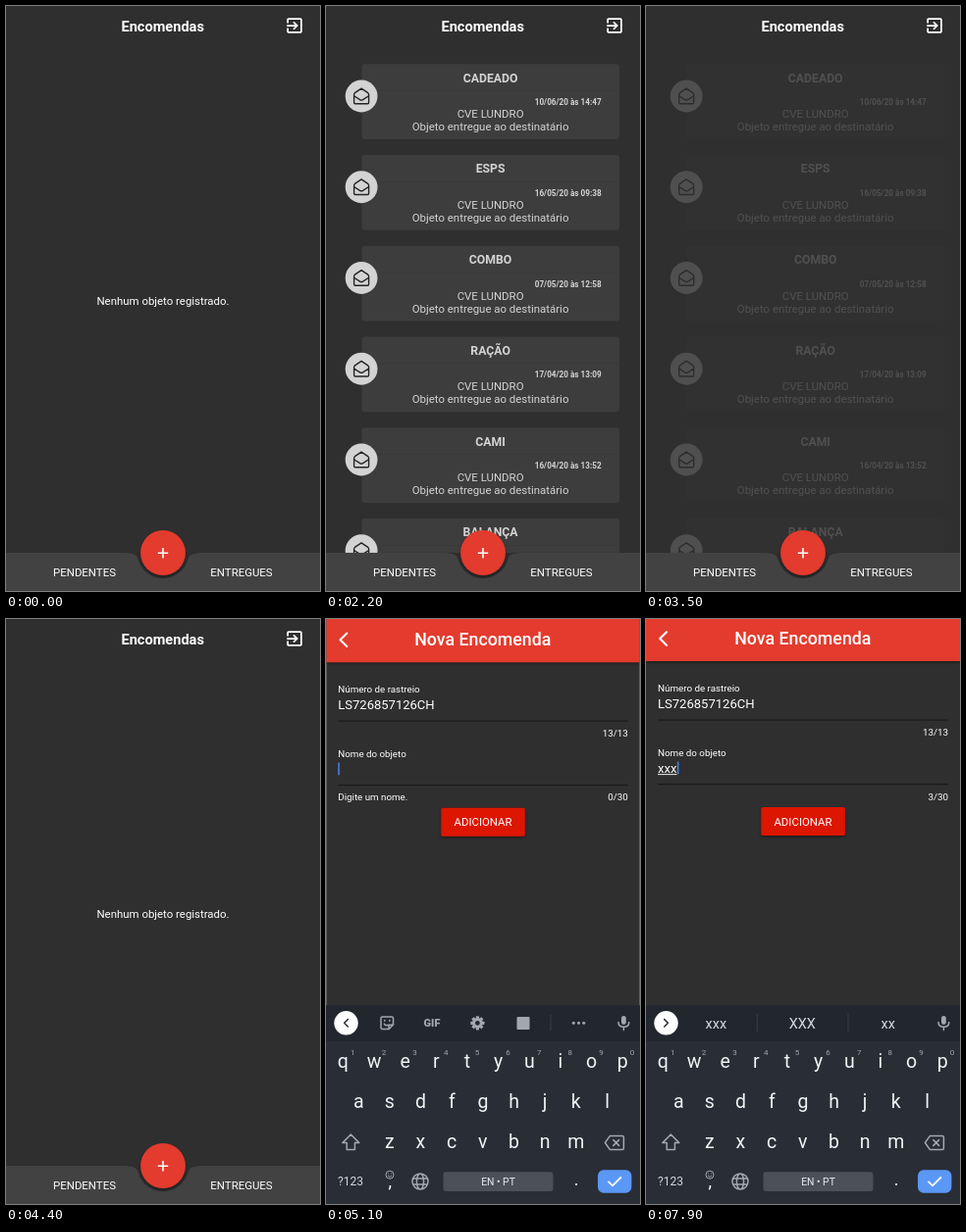
An HTML page that plays this animation: 320 by 597 pixels, repeating every 8000 ms.

```html
<!DOCTYPE html>
<html lang="pt">
<head>
<meta charset="utf-8">
<title>Encomendas</title>
<style>
html, body { margin: 0; width: 100%; height: 100%; overflow: hidden; background: #2f2f2f; }
svg { display: block; width: 100%; height: 100%; }
text { font-family: Roboto, "Open Sans", sans-serif; fill: #fff; white-space: pre; }
.line { fill: none; stroke-linecap: round; stroke-linejoin: round; }
.grey { stroke: #a3a8af; stroke-width: 1.5; }
</style>
</head>
<body>
<svg id="stage" viewBox="0 0 320 597" xmlns="http://www.w3.org/2000/svg"></svg>
<script>
const LOOP = 8000;
const RED = [227, 59, 46];
const TAB_MS = 1000, TO_DONE = 1595, TO_PENDING = 3230;
const OPEN_AT = 4502, OPEN_MS = 640, KEYS_AT = 4540;
const TYPED = [6800, 7200, 7600];
const STATUS = 28; // page area above the visible stage

const $ = id => document.getElementById(id);
const clamp = v => Math.max(0, Math.min(1, v));
const span = (t, from, len) => clamp((t - from) / len);
const mix = (a, b, k) => a + (b - a) * k;
const set = (id, attrs) => { for (const k in attrs) $(id).setAttribute(k, attrs[k]); };
const show = (id, on) => set(id, { display: on ? 'inline' : 'none' });

function bezier(x1, y1, x2, y2) {
  const at = (a, b, s) => 3 * a * s * (1 - s) ** 2 + 3 * b * s * s * (1 - s) + s ** 3;
  return x => {
    if (x <= 0 || x >= 1) return clamp(x);
    let lo = 0, hi = 1;
    for (let i = 0; i < 24; i++) {
      const mid = (lo + hi) / 2;
      if (at(x1, x2, mid) < x) lo = mid; else hi = mid;
    }
    return at(y1, y2, lo);
  };
}
const standard = bezier(.4, 0, .2, 1);
const accelerate = bezier(.4, 0, 1, 1);
const decelerate = bezier(0, 0, .2, 1);

const text = (s, x, y, size, { anchor = 'middle', weight = 400, fill = '#fff', id = '' } = {}) =>
  `<text ${id && `id="${id}"`} x="${x}" y="${y}" font-size="${size}" font-weight="${weight}" text-anchor="${anchor}" style="fill:${fill}">${s}</text>`;
const rect = (x, y, w, h, fill, r = 0, extra = '') =>
  `<rect x="${x}" y="${y}" width="${w}" height="${h}" rx="${r}" fill="${fill}" ${extra}/>`;
const line = (d, color, width, extra = '') =>
  `<path class="line" d="${d}" stroke="${color}" stroke-width="${width}" ${extra}/>`;
const icon = d => `<path class="line grey" d="${d}"/>`;

function card([name, date], i) {
  return `<g transform="translate(0 ${(i * 92.75).toFixed(2)})">
    ${rect(33, 59.3, 262.3, 76.7, '#424242', 3)}
    ${rect(33, 86.3, 262.3, .8, '#3b3b3b')}
    ${text(name, 164, 77.5, 12.24, { weight: 700 })}
    ${text(date, 277, 101, 8.16, { weight: 700, anchor: 'end' })}
    ${text('CVE LUNDRO', 164, 114, 11.43)}
    ${text('Objeto entregue ao destinatário', 164, 127, 11.43)}
    <circle cx="32.5" cy="92" r="16.4" fill="#fff"/>
    ${line('M25 90.2 Q25 89.3 25.8 88.7 L32.5 84.2 L39.2 88.7 Q40 89.3 40 90.2 V98.6 Q40 99.8 38.8 99.8 H26.2 Q25 99.8 25 98.6Z M25.4 92 L31 95.6 Q32.5 96.5 34 95.6 L39.6 92', '#222', 1.4)}
  </g>`;
}

const parcels = [
  ['CADEADO', '10/06/20 às 14:47'], ['ESPS', '16/05/20 às 09:38'],
  ['COMBO', '07/05/20 às 12:58'], ['RAÇÃO', '17/04/20 às 13:09'],
  ['CAMI', '16/04/20 às 13:52'], ['BALANÇA', '']
];

const home = `
  ${rect(0, 0, 320, 597, '#2f2f2f')}
  <g clip-path="url(#body)">
    <g id="empty">${text('Nenhum objeto registrado.', 160, 304.7, 11.43)}</g>
    <g id="list">${parcels.map(card).join('')}</g>
  </g>
  ${text('Encomendas', 159.7, 25.5, 14.6, { weight: 700 })}
  <path transform="translate(283.7 9.7) scale(.86)" fill="#fff" d="M10.09 15.59L11.5 17l5-5-5-5-1.41 1.41L12.67 11H3v2h9.67l-2.58 2.59zM19 3H5c-1.11 0-2 .9-2 2v4h2V5h14v14H5v-4H3v4c0 1.1.89 2 2 2h14c1.1 0 2-.9 2-2V5c0-1.1-.9-2-2-2z"/>
  <path fill="#424242" filter="url(#shade)" d="M0 558H120.9Q133.1 558 134.7 564.4A26.1 26.1 0 0 0 185.3 564.4Q186.9 558 199.1 558H320V597H0Z"/>
  ${text('PENDENTES', 80, 582, 11.43)}
  ${text('ENTREGUES', 240, 582, 11.43)}
  <g id="fab">
    <circle cx="160" cy="558" r="22.9" fill="rgb(${RED})" filter="url(#shade)"/>
    ${line('M160 553 V563.4 M154.8 558.2 H165.2', '#fff', 1.6, 'style="stroke-linecap:butt"')}
  </g>`;

const form = `
  ${rect(0, -STATUS, 320, 640, '#2f2f2f')}
  ${rect(0, -STATUS, 320, 43 + STATUS, `rgb(${RED})`, 0, 'filter="url(#shade)"')}
  ${line('M21 13.2 L14.2 20 L21 26.8', '#fff', 2.1)}
  ${text('Nova Encomenda', 159.8, 26.2, 17.8, { weight: 500 })}
  ${text('Número de rastreio', 12, 74, 9.8, { anchor: 'start' })}
  ${text('LS726857126CH', 12, 90.5, 13.06, { anchor: 'start' })}
  ${rect(12, 102.6, 296, 1, '#171717')}
  ${text('13/13', 308, 118.8, 9.8, { anchor: 'end' })}
  ${text('Nome do objeto', 12, 140, 9.8, { anchor: 'start' })}
  ${text('', 12, 156.8, 13.06, { anchor: 'start', id: 'name' })}
  ${rect(12, 158.2, 0, .9, '#fff', 0, 'id="composing"')}
  ${rect(12, 145.6, 1.5, 12.8, '#4285f4', 0, 'id="caret"')}
  ${rect(12, 168.2, 296, 1, '#171717')}
  ${text('Digite um nome.', 12, 184.5, 9.8, { anchor: 'start', id: 'hint' })}
  ${text('0/30', 308, 184.5, 9.8, { anchor: 'end', id: 'count' })}
  ${rect(117.3, 192, 85.6, 29, '#dc1405', 1.8, 'filter="url(#shade)"')}
  ${text('ADICIONAR', 160, 210.6, 11.43)}`;

const keyRow = (keys, x, y) =>
  [...keys].map((k, i) => text(k, (x + i * 31.65).toFixed(1), y, 19.5, { fill: '#f1f3f4' })).join('');
const digits = [...'1234567890'].map((n, i) =>
  text(n, (27.3 + i * 31.65).toFixed(1), 444.5, 8, { fill: '#a3a8af' })).join('');

const gear = () => {
  let teeth = '';
  for (let i = 0; i < 8; i++)
    teeth += rect(152.8, 405.2, 3.2, 4, '#a3a8af', .6, `transform="rotate(${i * 45} 154.4 412.3)"`);
  return teeth + '<circle cx="154.4" cy="412.3" r="3.9" fill="none" stroke="#a3a8af" stroke-width="3"/>';
};

const keyboard = `
  ${rect(0, 394.4, 320, 210, '#292e36')}
  ${rect(0, 394.4, 320, 36.6, '#22272f')}
  <circle cx="20.5" cy="412.3" r="12.2" fill="#fff"/>
  ${line('M22.3 408.6 L18.6 412.3 L22.3 416', '#2b3038', 1.5, 'id="chevron"')}
  <g id="tools">
    ${icon('M57.5 406 H67 Q68.5 406 68.5 407.5 V414 L64 418.6 H57.5 Q56 418.6 56 417 V407.5 Q56 406 57.5 406Z M64 418.3 V414.2 H68.3 M59.8 409.4 V410.2 M64.8 409.4 V410.2 M59.4 413.2 Q61 415.4 63 414.4')}
    ${text('GIF', 108, 416.2, 11, { weight: 800, fill: '#a3a8af' })}
    ${gear()}
    ${rect(194.5, 406, 13, 13, '#a3a8af', 1)}
    ${rect(228.6, 404, .8, 16, '#3c424b')}
    ${[252.3, 257.5, 262.7].map(x => `<circle cx="${x}" cy="412.3" r="1.5" fill="#a3a8af"/>`).join('')}
  </g>
  <g id="words">
    ${rect(112.8, 402.5, .8, 19.5, '#3c424b')}
    ${rect(205.6, 402.5, .8, 19.5, '#3c424b')}
    ${[71.3, 159.3, 246.8].map((x, i) => text('', x, 417.6, 14.5, { id: 'word' + i, fill: '#d5d8dc' })).join('')}
  </g>
  ${rect(301, 405, 4.8, 9, '#a3a8af', 2.4)}
  ${icon('M298 411.5 Q298 416.3 303.4 416.3 Q308.8 416.3 308.8 411.5 M303.4 416.5 V419.4')}
  ${keyRow('qwertyuiop', 17.4, 457.6)}${digits}
  ${keyRow('asdfghjkl', 33.3, 498.6)}
  ${keyRow('zxcvbnm', 64.8, 539.6)}
  ${icon('M25.3 526 L33.8 534.6 H29.4 V541.6 H21.2 V534.6 H16.8Z')}
  ${icon('M289.3 527.6 H302.2 Q303.4 527.6 303.4 528.8 V540.2 Q303.4 541.4 302.2 541.4 H289.3 L284.4 534.5Z M292.8 531.6 L298.6 537.4 M298.6 531.6 L292.8 537.4')}
  ${text('?123', 25, 578.2, 12, { fill: '#d5d8dc' })}
  <circle cx="65" cy="567.2" r="4" fill="none" stroke="#a3a8af"/>
  ${line('M63.4 566 V566.2 M66.6 566 V566.2 M63.2 568.4 Q65 570.4 66.8 568.4', '#a3a8af', .9)}
  ${text(',', 65.3, 580.4, 18)}
  ${icon('M88 574 A8 8 0 0 1 104 574 A8 8 0 0 1 88 574 M92.4 574 A3.6 8 0 0 1 99.6 574 A3.6 8 0 0 1 92.4 574 M89 571 H103 M89 577 H103')}
  ${rect(119.5, 564.3, 112, 19.8, '#4c5159', 3)}
  ${text('EN • PT', 175.5, 578, 10.4, { fill: '#e8eaed' })}
  ${text('.', 255, 578.4, 18)}
  ${rect(277, 562.3, 34.4, 23.4, '#5b97f5', 6)}
  ${line('M288 574.4 L292 578.4 L300.4 570', '#fff', 1.8)}`;

$('stage').innerHTML = `
  <defs>
    <filter id="shade" x="-30%" y="-30%" width="160%" height="170%">
      <feDropShadow dx="0" dy="1.5" stdDeviation="1.8" flood-color="#000" flood-opacity=".4"/>
    </filter>
    <clipPath id="body"><rect y="43" width="320" height="515"/></clipPath>
    <clipPath id="shape"><rect id="hole"/></clipPath>
  </defs>
  ${home}
  ${rect(0, 0, 320, 597, '#000', 0, 'id="scrim"')}
  <g id="sheet" clip-path="url(#shape)">
    ${rect(0, 0, 0, 0, '#fff', 0, 'id="fill"')}
    ${line('M-5.2 0 H5.2 M0 -5.2 V5.2', '#fff', 1.6, 'id="plus"')}
    <g id="form">${form}</g>
  </g>
  <g id="keys">${keyboard}</g>`;

// Shared-axis move: fade out in the first 30 %, fade in over the rest.
function tabs(t) {
  const back = t >= TO_PENDING;
  const x = span(t, back ? TO_PENDING : TO_DONE, TAB_MS);
  const move = 30 * standard(x), dir = back ? 1 : -1;
  const leave = { opacity: 1 - accelerate(clamp(x / .3)), dx: dir * move };
  const enter = { opacity: decelerate(clamp((x - .3) / .7)), dx: dir * (move - 30) };
  const lift = t >= KEYS_AT + 40 ? -82 : 0;
  const place = (id, s, dy) => set(id, { opacity: s.opacity, transform: `translate(${s.dx} ${dy})` });
  place('empty', back ? enter : leave, lift);
  place('list', back ? leave : enter, 0);
}

function sheet(t) {
  const x = span(t, OPEN_AT, OPEN_MS), p = standard(x);
  const on = t >= OPEN_AT;
  show('sheet', on);
  show('fab', !on);
  set('scrim', { opacity: .54 * clamp(x / .2) });
  const left = mix(137.1, 0, p), top = mix(535.1, -STATUS, p);
  const width = 320 - 2 * left, height = mix(580.9, 597, p) - top;
  const box = { x: left, y: top, width, height, rx: width / 2 * (1 - p) };
  const k = width / 320;
  set('hole', box);
  set('fill', { ...box, fill: `rgb(${RED.map(c => Math.round(mix(c, 255, clamp(p * 1.4))))})` });
  set('plus', {
    opacity: 1 - clamp(x / .2),
    transform: `translate(160 ${top + width / 2}) scale(${width / 45.8})`
  });
  set('form', {
    opacity: span(x, .2, .2),
    transform: `translate(${left} ${top + STATUS * k}) scale(${k})`
  });
}

function typing(t) {
  const n = TYPED.filter(at => t >= at).length;
  const word = 'x'.repeat(n), width = n * 6.48;
  const since = t - (n ? TYPED[n - 1] : 5000);
  $('name').textContent = word;
  $('count').textContent = n + '/30';
  set('composing', { width });
  set('caret', { x: 12 + width + (n ? .4 : 0) });
  show('caret', since < 0 || since % 1000 < 500);
  show('hint', !n);
  show('tools', !n);
  show('words', n);
  [word, word.toUpperCase(), n === 2 ? 'xxx' : 'xx'].forEach((w, i) => { $('word' + i).textContent = w; });
  set('chevron', { transform: n ? 'rotate(180 20.5 412.3)' : '' });
  const up = decelerate(span(t, KEYS_AT, 140));
  show('keys', up > 0);
  set('keys', { transform: `translate(0 ${203 * (1 - up)})` });
}

function draw(t) {
  tabs(t);
  sheet(t);
  typing(t);
}

const start = performance.now();
function tick() {
  draw((performance.now() - start) % LOOP);
  requestAnimationFrame(tick);
}
tick();
</script>
</body>
</html>
```
